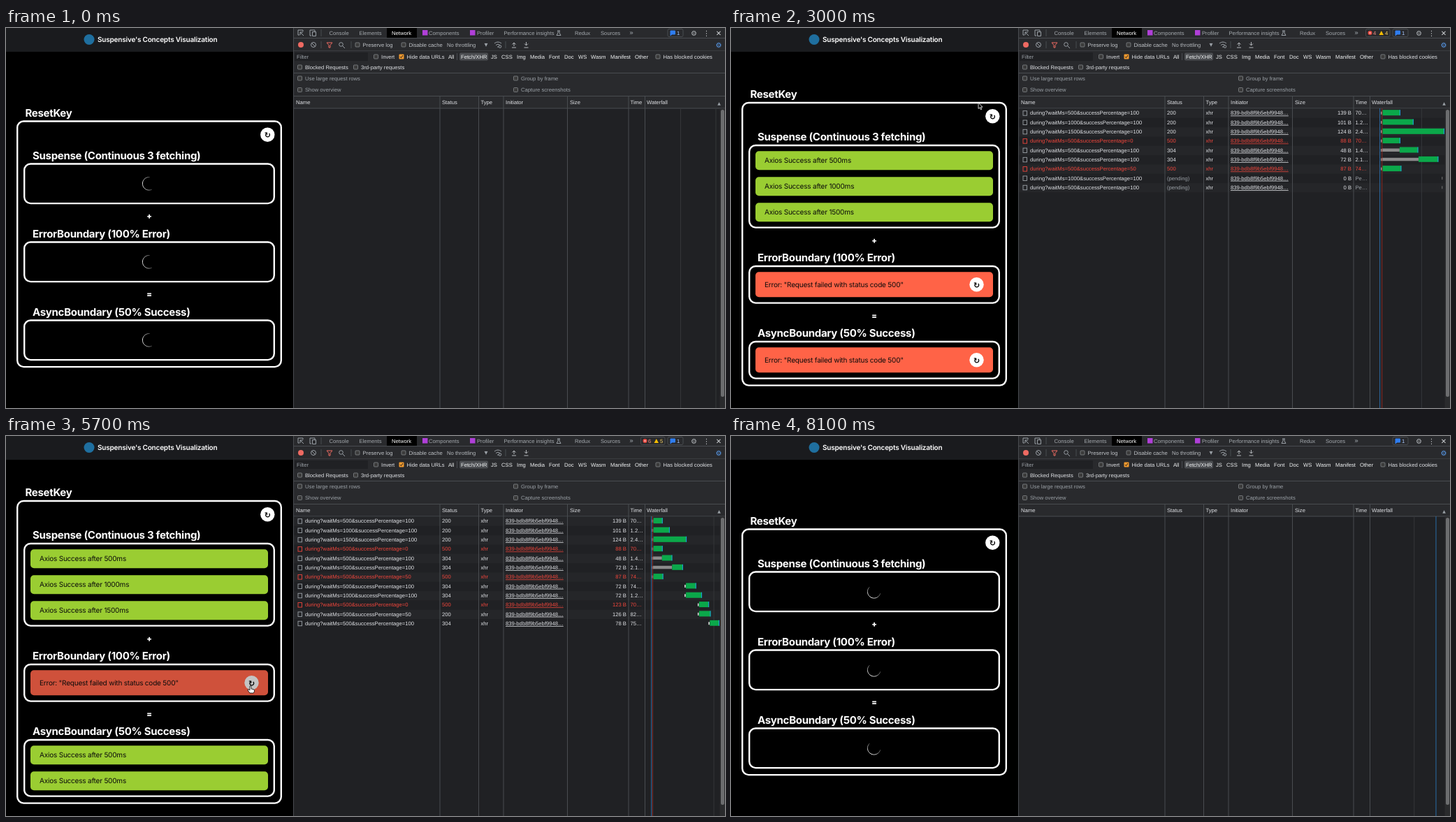
Write an HTML page that moves like this. It is 1029x544 px and loops after 8200 ms.

```html
<!DOCTYPE html>
<html lang="en">
<head>
<meta charset="utf-8">
<title>Concepts Visualization</title>
<style>
  html, body { margin: 0; width: 100%; height: 100%; overflow: hidden; background: #000; }
  svg { display: block; text-rendering: geometricPrecision; }
  text { font: 7.68px "Liberation Sans", Arial, sans-serif; white-space: pre; }
  .app { font: 10px Inter, sans-serif; letter-spacing: -.02em; }
  .title { font-weight: 600; }
  .head { font-size: 15px; font-weight: 700; }
  .sign { font-size: 11px; font-weight: 900; }
  .icon { font: 10px "DejaVu Sans", sans-serif; }
  .turn { font: bold 11px "DejaVu Sans", sans-serif; }
</style>
</head>
<body>
<svg width="1029" height="544" viewBox="0 0 1029 544">
  <g id="chrome"></g><g id="network"></g><g id="page"></g>
</svg>
<script>
const LOOP = 8.2, RESET = 7.8;
const GREY = '#9aa0a6', LIGHT = '#dfe1e5', RED = '#f0463c', LINE = '#494c50';

const rect = (x, y, w, h, fill, more = '') =>
  `<rect x="${x}" y="${y}" width="${w}" height="${h}" fill="${fill}" ${more}/>`;
const circle = (x, y, r, fill, more = '') => `<circle cx="${x}" cy="${y}" r="${r}" fill="${fill}" ${more}/>`;
const path = (d, stroke, more = '') => `<path d="${d}" fill="none" stroke="${stroke}" ${more}/>`;
const vline = (x, y1, y2, color) => path(`M${x} ${y1}V${y2}`, color);
const hline = (y, color) => path(`M412 ${y}H1029`, color);
const label = (x, y, s, fill = LIGHT, more = '') =>
  `<text x="${x}" y="${y + 2.75}" fill="${fill}" ${more}>${s.replace(/&/g, '&amp;')}</text>`;
const app = (x, y, s, fill, cls = '', more = '') =>
  `<text class="app ${cls}" x="${x}" y="${y}" fill="${fill}" ${more}>${s}</text>`;
const icon = (x, y, s, fill = GREY, more = '') =>
  `<text class="icon" text-anchor="middle" x="${x}" y="${y + 3.6}" fill="${fill}" ${more}>${s}</text>`;
const box = (x, y, color = '#85888c') =>
  rect(x - 3, y - 3, 6, 6, '#3b3b3b', `rx="1" stroke="${color}" stroke-width=".8"`);
const check = (x, y, s, fill = LIGHT) => box(x, y) + label(x + 7.5, y, s, fill);

function drawChrome() {
  const tabs = [[462.5, 'Console'], [505.5, 'Elements'], [605, 'Components'], [674, 'Profiler'],
    [712.5, 'Performance insights'], [814, 'Redux'], [851, 'Sources']];
  const kinds = [[633, 'All'], [651, 'Fetch/XHR'], [694, 'JS'], [709, 'CSS'], [731, 'Img'], [750, 'Media'],
    [777, 'Font'], [799, 'Doc'], [819, 'WS'], [837, 'Wasm'], [865, 'Manifest'], [900, 'Other']];
  const heads = [[415, 'Name'], [624, 'Status'], [679.5, 'Type'], [715, 'Initiator'],
    [807, 'Size'], [893.5, 'Time'], [917, 'Waterfall']];
  return rect(0, 0, 411, 34, '#1a1b1e') + circle(119, 16.5, 7.5, '#1f6f9f')
    + app(131, 20.3, "Suspensive's Concepts Visualization", '#fff', 'title')
    + rect(411, 0, 618, 544, '#202124') + rect(411, 0, 618, 115, '#292a2d')
    + vline(411.5, 0, 544, LINE) + rect(545, 0, 43, 14.5, '#000') + label(552, 7, 'Network', '#fff')
    + tabs.map(([x, s]) => label(x, 7, s, '#a4a9ae')).join('')
    + rect(596, 3, 7.5, 7.5, '#b03fd8') + rect(664, 3, 7.5, 7.5, '#b03fd8')
    + path('M789 4H793M790 4V7L788 10.5H794L792 7V4', GREY)
    + icon(895, 6.5, '»') + icon(984.5, 7, '⚙', '#b4b8bc') + icon(1002.5, 7, '⋮', '#d0d3d6') + icon(1020, 7, '✕', '#d0d3d6')
    + path('M420 10H418V3H425V5M421 6L426 11M421 6V10M421 6H425', GREY)
    + path('M437 11H435V3H442V5M438.5 5.5H443.5V11.5H438.5Z', GREY)
    + vline(451, 2, 12, LINE) + vline(451, 19, 29, LINE) + vline(494, 19, 29, LINE)
    + rect(947, 1.5, 22, 11, 'none', `stroke="${LINE}" rx="2"`)
    + path('M951 4H957.5V9H953L951 11Z', '#2f7df0', 'style="fill:#2f7df0"') + label(960, 7, '1', '#a9c7fa')
    + hline(14.5, LINE) + hline(32.5, '#3a3c40')
    + circle(422, 24, 4, '#ee6a62') + circle(440, 24, 3.5, 'none', `stroke="${GREY}"`) + path('M437.5 21.5L442.5 26.5', GREY)
    + path('M459 21H467L464 24.5V28H462V24.5Z', '#ee6a62')
    + circle(479.5, 23.5, 2.8, 'none', `stroke="${GREY}"`) + path('M481.5 25.5L485 29', GREY)
    + check(503, 24, 'Preserve log', '#c0c4c8') + check(569, 24, 'Disable cache', '#c0c4c8')
    + label(631, 24, 'No throttling', '#b4b8bc') + icon(687, 23.5, '▾')
    + path('M699 22Q704 18 709 22M701 24.5Q704 22 707 24.5M703 27H705', GREY)
    + circle(707, 26.5, 1.8, 'none', `stroke="${GREY}"`)
    + vline(715, 19, 29, LINE)
    + path('M727 26V21M724.5 23.5L727 21L729.5 23.5M724 28H730M744.5 20V25M742 22.5L744.5 25L747 22.5M741.5 28H747.5', '#b4b8bc')
    + icon(1020, 24, '⚙', '#5aa0f5')
    + rect(413, 35, 105, 12, '#202124') + label(416, 41, 'Filter', GREY)
    + check(529.5, 41, 'Invert') + rect(562.5, 37.5, 7, 7, '#f29a2e', 'rx="1"') + path('M564 41L565.5 42.8L568 39', '#222')
    + label(573.5, 41, 'Hide data URLs') + rect(649, 35.5, 41, 11, '#4b4d51', 'rx="2"')
    + vline(645.5, 36, 46, LINE) + kinds.map(([x, s]) => label(x, 41, s, '#f1f3f4')).join('')
    + check(933, 41, 'Has blocked cookies')
    + check(420.5, 56, 'Blocked Requests') + check(500.5, 56, '3rd-party requests') + hline(64.5, LINE)
    + check(420.5, 72, 'Use large request rows', GREY) + check(729.5, 72, 'Group by frame', GREY)
    + check(420.5, 88.5, 'Show overview', GREY) + check(729.5, 88.5, 'Capture screenshots', GREY)
    + hline(97.5, LINE) + heads.map(([x, s]) => label(x, 106, s)).join('')
    + icon(1020.5, 106, '▲', GREY, 'style="font-size:6px"') + hline(115, LINE);
}

// waitMs, successPercentage, status, size, time, start, stalled until, end (seconds)
const requests = [
  [500, 100, 200, '139 B', '70…', .335, 0, 1.05],
  [1000, 100, 200, '101 B', '1.2…', .335, 0, 1.56],
  [1500, 100, 200, '124 B', '2.4…', .335, 0, 2.78],
  [500, 0, 500, '88 B', '70…', .335, 0, 1.05],
  [500, 100, 304, '48 B', '1.4…', .335, 1.05, 1.74],
  [500, 100, 304, '72 B', '2.1…', .335, 1.78, 2.52],
  [500, 50, 500, '87 B', '74…', .335, 0, 1.09],
  [500, 100, 304, '72 B', '74…', 2.68, 0, 3.47],
  [1000, 100, 304, '72 B', '1.2…', 2.68, 0, 3.89],
  [500, 0, 500, '123 B', '70…', 3.63, 0, 4.4],
  [500, 50, 200, '126 B', '82…', 3.63, 0, 4.52],
  [500, 100, 304, '78 B', '75…', 4.41, 0, 5.2],
  [500, 0, 500, '110 B', '73…', 5.57, 0, 6.35],
].map(([wait, pct, status, size, time, start, stall, end]) => ({ wait, pct, status, size, time, start, stall, end }));

// Neighbours listed in reverse order until the given time
const swaps = [[3, 2.6], [7, 3.6], [9, 4.5]];
const isDone = (r, t) => t >= r.end + .1;

function listAt(t) {
  if (t >= RESET) return [];
  const list = [...requests];
  for (const [i, until] of swaps) if (t < until) [list[i], list[i + 1]] = [list[i + 1], list[i]];
  return list.filter(r => t >= r.start + .25);
}

function spanAt(t, list) {
  if (t < .2 || (t >= RESET && t < 8)) return .404;
  if (t >= 8 || t < .4) return .325;
  return Math.max(.375, t >= 6.9 ? 6.6 : 0, ...list.map(r => isDone(r, t) ? r.end : r.start));
}

function drawBar(r, y, at, done) {
  const x = at(r.start);
  if (!done) return rect(Math.min(x, 1020), y - 2, 1, 4, '#777');
  const from = r.stall ? at(r.stall) : x + 2, to = Math.min(at(r.end) + 1, 1021);
  return rect(x, y - 2, 1.6, 4, '#ddd')
    + (r.stall ? rect(x + 1.5, y - 2.5, from - x - 1.5, 4.5, '#8b8b8b') : '')
    + rect(from, y - 4.5, Math.max(to - from, 2), 8, '#0ba84a') + rect(to - 1, y - 4.5, 1, 8, '#1d9be0');
}

function drawNetwork(t) {
  const list = listAt(t), scale = 103 / spanAt(t, list), at = s => 918 + s * scale;
  let out = list.map((r, i) => i % 2 ? '' : rect(412, 115.5 + i * 13.32, 610, 13.32, '#252629')).join('');
  const step = [.1, .2, .5, 1, 2, 5].find(s => s * scale >= 45) * scale * .99;
  for (let x = 915 + step; x < 1021; x += step) out += vline(x, 115, 544, '#35373a');
  for (const x of [621, 676.5, 712, 803.5, 891, 914.5]) out += vline(x, 98, 544, LINE);
  list.forEach((r, i) => {
    const y = 121.7 + i * 13.32, done = isDone(r, t), failed = done && r.status == 500;
    const color = failed ? RED : LIGHT, dim = done ? color : GREY;
    out += rect(418, y - 3, 5.5, 6.5, 'none', `stroke="${failed ? RED : GREY}" stroke-width=".9"`)
      + label(428, y, `during?waitMs=${r.wait}&successPercentage=${r.pct}`, color)
      + label(624, y, done ? '' + r.status : '(pending)', dim) + label(679.5, y, 'xhr', color)
      + label(715, y, '839-bdb8f9b5ebf9948…', color, 'text-decoration="underline"')
      + label(888, y, done ? r.size : '0 B', color, 'text-anchor="end"')
      + label(893.5, y, done ? r.time : 'Pe…', dim) + drawBar(r, y, at, done);
  });
  if (t >= 8 || (t >= .2 && t < RESET)) out += vline(at(.287), 115, 544, '#2a6da8');
  if (t >= .4 && t < RESET) out += vline(at(.37), 115, 544, '#8c2b25');
  out += rect(1021.5, 115.5, 7.5, 429, '#2a2b2d') + rect(1023, 117, 5, 411, '#6c6d6f', 'rx="2.5"');

  const fails = list.filter(r => r.status == 500 && isDone(r, t)).length;
  if (fails) out += rect(908.5, 1.5, 34.5, 11, 'none', `stroke="${LINE}" rx="2"`)
    + circle(914.5, 7, 3, '#e8453c') + path('M913.3 5.8L915.7 8.2M915.7 5.8L913.3 8.2', '#fff', 'stroke-width=".7"')
    + label(919, 7, '' + fails * 2, '#f28b82')
    + '<path d="M927.5 10L930.8 4L934 10Z" fill="#f5bd00"/>' + label(936, 7, fails > 2 ? '5' : '4', '#fdd663');
  return out;
}

// Pointer stops: time, x, y
const stops = [[1.9, 300, 126], [2.2, 322, 115], [3, 354, 107], [3.4, 373, 122], [3.75, 373, 122], [4.3, 372, 191],
  [5.3, 350, 358], [6.2, 350, 358], [6.9, 250, -20]];

function pointerAt(t) {
  const i = stops.findIndex(s => s[0] > t);
  if (i < 1) return null;
  const [a, b] = [stops[i - 1], stops[i]], k = (t - a[0]) / (b[0] - a[0]), e = k * k * (3 - 2 * k);
  return { x: a[1] + (b[1] - a[1]) * e, y: a[2] + (b[2] - a[2]) * e };
}

const success = ms => ({ text: `Axios Success after ${ms}ms`, h: 27, fill: '#9acd32', dark: '#7da429' });
const failure = [{ text: 'Error: "Request failed with status code 500"', h: 36, fill: '#ff6347', dark: '#cf513b', retry: true }];

// An empty list means the section is still loading
function sectionsAt(t) {
  const reload = t >= RESET || t < 1.1;
  return [
    ['Suspense (Continuous 3 fetching)', t < 2.65 || t >= RESET ? [] : [500, 1000, 1500].map(success)],
    ['ErrorBoundary (100% Error)', reload || (t >= 3.65 && t < 4.5) || (t >= 5.8 && t < 6.45) ? [] : failure],
    ['AsyncBoundary (50% Success)', reload || (t >= 3.65 && t < 5.25) ? [] : t < 3.65 ? failure : [500, 500].map(success)],
  ];
}
const heightOf = items => items.length ? items.reduce((h, i) => h + i.h + 10, 9) : 59;

function drawSpinner(x, y, t) {
  const shift = t > 3.5 && t < RESET ? -112 : 0, middle = 170 + shift + 360 * (t > 7.7 ? t - LOOP : t) / .733;
  const point = deg => `${x + 9.3 * Math.cos(deg * Math.PI / 180)} ${y + 9.3 * Math.sin(deg * Math.PI / 180)}`;
  let out = '';
  for (let a = -105; a < 105; a += 15)
    out += path(`M${point(middle + a)}A9.3 9.3 0 0 1 ${point(middle + a + 15)}`, '#fff',
      `opacity="${(.25 + .65 * Math.cos((a + 7) * Math.PI / 220)).toFixed(2)}"`);
  return out;
}

function drawPage(t) {
  const sections = sectionsAt(t), pointer = pointerAt(t);
  let overButton = false;
  const frame = (x, y, w, h) => rect(x + 1.2, y + 1.2, w - 2.4, h - 2.4, 'none', 'rx="9" stroke="#fff" stroke-width="2.4"');
  const button = (x, y) => {
    const hover = pointer && Math.hypot(pointer.x - x, pointer.y - y) < 10;
    overButton ||= hover;
    return circle(x, y, 10.2, hover ? '#c4c4c4' : '#fff')
      + `<text class="turn" text-anchor="middle" x="${x}" y="${y + 4.6}">↻</text>`;
  };
  const total = 177 + sections.reduce((h, [, items]) => h + heightOf(items), 0);
  const top = 309.3 - total / 2;
  let y = top + 61;
  let out = app(27.5, top - 5.7, 'ResetKey', '#fff', 'head') + frame(15, top, 380, total) + button(374.3, top + 20.5);
  sections.forEach(([name, items], n) => {
    const h = heightOf(items);
    out += app(38, y - 5.7, name, '#fff', 'head') + frame(25, y, 360, h);
    if (!items.length) out += drawSpinner(204.7, y + 29.5, t);
    let iy = y + 9.5;
    for (const item of items) {
      const hover = pointer && pointer.x > 35 && pointer.x < 375 && pointer.y > iy && pointer.y < iy + item.h;
      out += rect(35, iy, 340, item.h, hover ? item.dark : item.fill, 'rx="5"')
        + app(48, iy + item.h / 2 + 3.6, item.text, '#0b0b0b');
      if (item.retry) out += button(351.5, iy + item.h / 2);
      iy += item.h + 10;
    }
    y += h;
    if (n < 2) out += app(205, y + 21, '+='[n], '#fff', 'sign', 'text-anchor="middle"');
    y += 53;
  });
  if (pointer) {
    const shape = overButton
      ? 'M-1 0Q0-1 1 0V4L5 5Q6 6 5 9L4 10H-1L-4 6Q-4 4-2 5L-1 6Z'
      : 'M0 0V8.5L2 6.8L3.4 9.8L4.8 9.2L3.4 6.2H6Z';
    out += `<path d="${shape}" transform="translate(${pointer.x} ${pointer.y})" fill="${overButton ? '#fff' : '#000'}"`
      + ` stroke="${overButton ? '#000' : '#fff'}" stroke-width=".8"/>`;
  }
  return out;
}

const [chrome, network, page] = ['chrome', 'network', 'page'].map(id => document.getElementById(id));
chrome.innerHTML = drawChrome();
let last = -1;
function tick() {
  // The picture advances ten times a second
  const step = Math.floor(performance.now() / 100) % (LOOP * 10);
  if (step !== last) {
    last = step;
    network.innerHTML = drawNetwork(step / 10);
    page.innerHTML = drawPage(step / 10);
  }
  requestAnimationFrame(tick);
}
tick();
</script>
</body>
</html>
```
